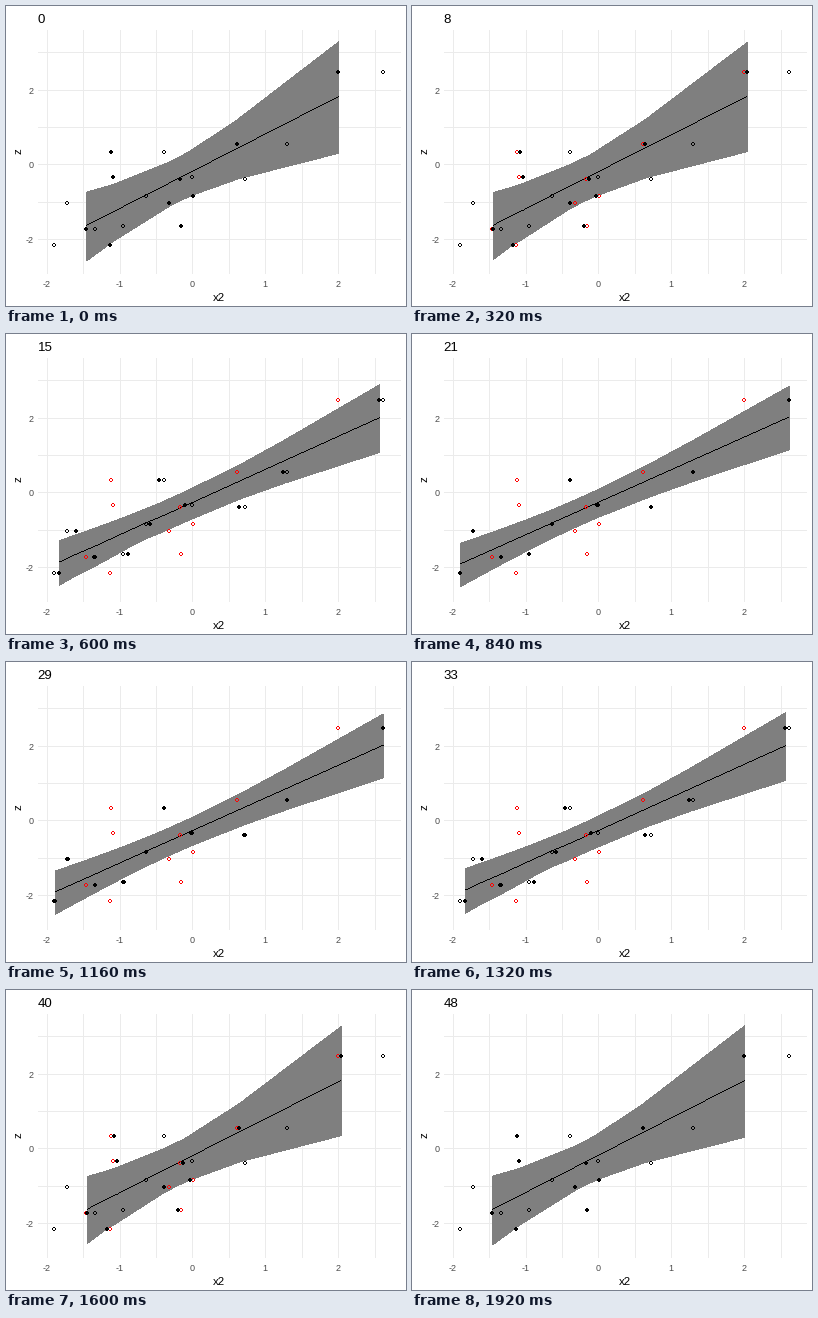
A matplotlib script for the animation above (1960 ms loop, 400 by 300 pixels).

```python
import numpy as np
import matplotlib.pyplot as plt
from matplotlib.animation import FuncAnimation
from matplotlib.path import Path
from matplotlib.transforms import Affine2D

W, H, DPI = 400, 300, 100
HALF = 24
FRAMES = 2 * HALF + 1
INK, GREY, GRID = "black", "#4D4D4D", "#EBEBEB"

# Panel edges, place of the zero point and size of one unit, in pixels
LEFT, RIGHT, TOP, BOTTOM = 32, 394.5, 23, 268
X0, Y0, UX, UY = 186.95, 157.9, 72.85, 37.35

plt.rcParams["font.family"] = "Liberation Sans"

z = np.array([2.452, .522, .313, -.356, -.41, -1.063, -.87, -1.673, -1.754, -2.187])
x1 = np.array([2.003, .611, -1.118, -1.084, -.171, -.322, .003, -.157, -1.457, -1.132])
x2 = np.array([2.616, 1.298, -.391, -.012, .721, -1.725, -.639, -.953, -1.339, -1.9])


def px(size):
    """Font or line size in pixels, converted to points."""
    return size * 72 / DPI


def fit(x):
    """Rows of x, fitted value, lower and upper bound of the regression."""
    slope, icpt = np.polyfit(x, z, 1)
    mid = icpt + slope * x
    dev = x - x.mean()
    var = np.sum((z - mid) ** 2) / (len(x) - 2)
    se = np.sqrt(var * (1 / len(x) + dev ** 2 / np.sum(dev ** 2)))
    return np.array([x, mid, mid - 1.96 * se, mid + 1.96 * se])


def ease(t):
    """Exponential in-out."""
    if t <= 0 or t >= 1:
        return float(t >= 1)
    if t < .5:
        return 2 ** (20 * t - 10) / 2
    return 1 - 2 ** (10 - 20 * t) / 2


start, end = fit(x1), fit(x2)

fig = plt.figure(figsize=(W / DPI, H / DPI), dpi=DPI, facecolor="white")
ax = fig.add_axes([LEFT / W, 1 - BOTTOM / H,
                   (RIGHT - LEFT) / W, (BOTTOM - TOP) / H])
ax.set(xlim=((LEFT - X0) / UX, (RIGHT - X0) / UX),
       ylim=((Y0 - BOTTOM) / UY, (Y0 - TOP) / UY))
ax.axis("off")

# Half-pixel shifts, so that rounding picks the pixel a point lies in
on_grid = Affine2D().translate(-.5, -.5)
on_pixel = ax.transData + Affine2D().translate(-.5, .5)

for gx in np.arange(-2, 2.6, .5):
    ax.axvline(gx, color=GRID, lw=px(1), zorder=0).set_transform(
        ax.get_xaxis_transform() + on_grid)
for gy in range(-2, 4):
    ax.axhline(gy, color=GRID, lw=px(1), zorder=0).set_transform(
        ax.get_yaxis_transform() + on_grid)


def label(x, y, text, size, color=INK, **kw):
    opts = dict(ha="center", va="baseline") | kw
    return fig.text(x / W, 1 - y / H, text, fontsize=px(size), color=color, **opts)


for v in range(-2, 3):
    label(X0 + UX * v - .5, 281, str(v), 9, GREY)
for v in (-2, 0, 2):
    label(28, Y0 + 4.3 - UY * v, str(v), 9, GREY, ha="right")
label(212.5, 295, "x2", 11.5)
label(12.5, 145, "z", 11.5, rotation=90, va="center")
title = label(31.5, 17, "0", 13.2, ha="left")

ribbon, = ax.fill([0, 0, 0], [0, 0, 0], color="#7F7F7F", lw=0,
                  antialiased=False, zorder=1)
line, = ax.plot([], [], ",", color=INK, transform=on_pixel, zorder=2)

# Pixel circles, four wide: a square without corners, solid or hollow
rim = [(-1, -2), (1, -2), (1, -1), (2, -1), (2, 1), (1, 1),
       (1, 2), (-1, 2), (-1, 1), (-2, 1), (-2, -1), (-1, -1)]
hole = [(-1, -1), (-1, 1), (1, 1), (1, -1)]
disc = Path(rim + rim[:1], closed=True)
ring = Path.make_compound_path(disc, Path(hole + hole[:1], closed=True))


def dots(x, color, shape, order):
    return ax.plot(x, z, ls="", marker=shape, ms=px(4), mew=0, color=color,
                   transform=on_pixel, zorder=order)[0]


dots(x2, INK, ring, 3)
dots(x1, "red", ring, 4)
moving = dots(x1, INK, disc, 5)


def draw(i):
    k = ease(1 - abs(i - HALF) / HALF)
    pose = start + k * (end - start)
    moving.set_xdata(pose[0])
    x, mid, lo, hi = pose[:, np.argsort(pose[0])]
    cols = np.arange(x[0], x[-1], 1 / UX)
    line.set_data(cols, np.interp(cols, x, mid))
    ribbon.set_xy(np.column_stack([np.r_[x, x[::-1]], np.r_[hi, lo[::-1]]]))
    title.set_text(str(i))
    return ribbon, line, moving, title


anim = FuncAnimation(fig, draw, frames=FRAMES, interval=40, repeat=True,
                     repeat_delay=0, blit=False)
plt.show()
```
